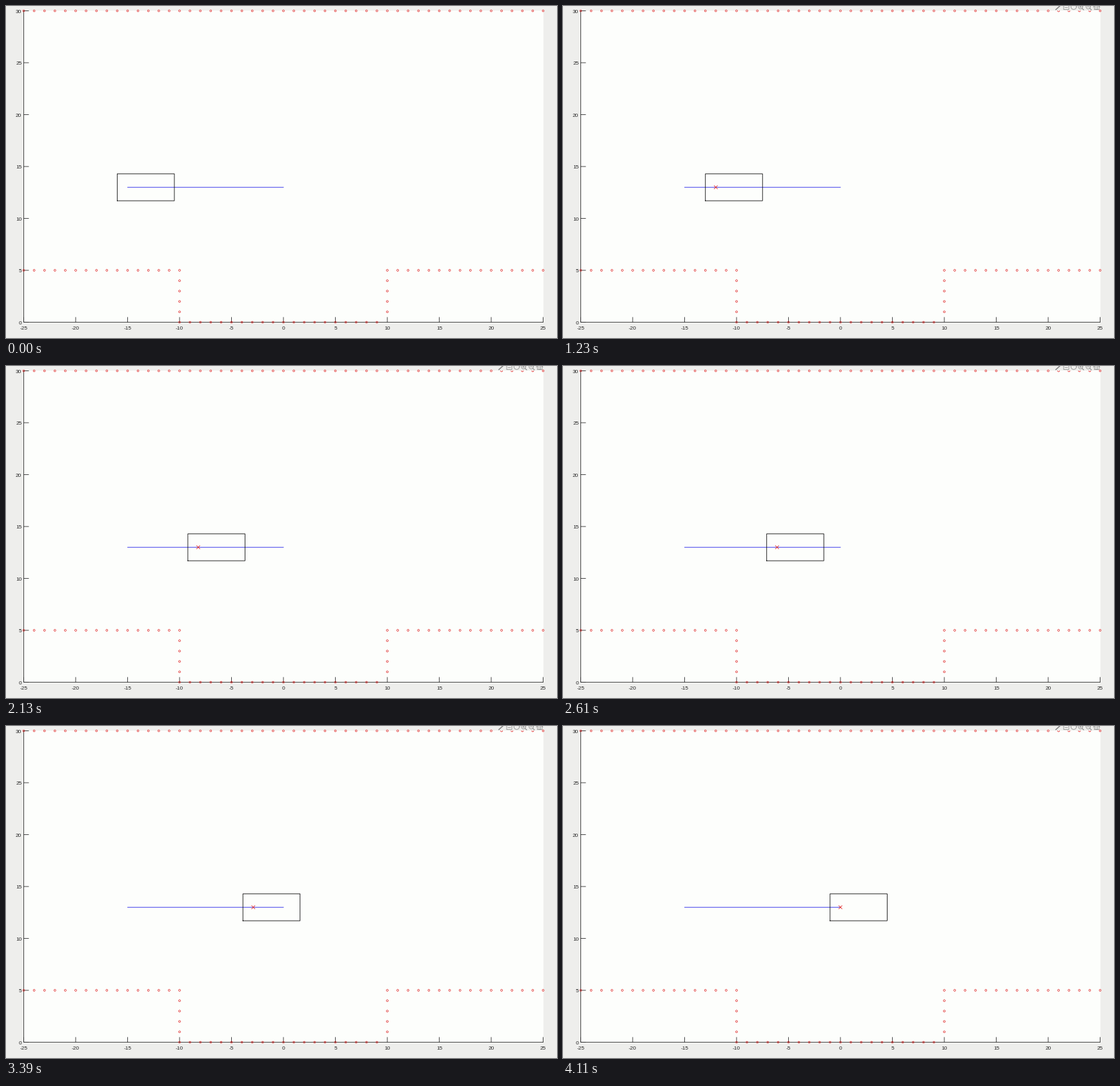
A matplotlib script that plays this animation: 854 by 515 pixels, repeating every 4140 ms.

```python
import numpy as np
import matplotlib.pyplot as plt
from matplotlib.animation import FuncAnimation
from matplotlib.collections import PatchCollection
from matplotlib.patches import Circle, Rectangle

W, H, DPI = 854, 515, 64
PT = 72 / DPI                     # points per pixel
TICK_MS, TICKS = 30, 138
START, STALL = 20, 91             # first move, and one repeated position
STEPS, EASE = 150, 5.39           # path steps of 0.1 units, slight ease-out
INK, RED, BLUE, GREY = "#262626", "#e02828", "#1c1ce8", "#858585"
BACK, PAPER = "#eeeeec", "#fdfefc"

fig = plt.figure(figsize=(W / DPI, H / DPI), dpi=DPI, facecolor=BACK)
ax = fig.add_axes([0, 0, 1, 1])
ax.set(xlim=(0, W), ylim=(H, 0))
ax.axis("off")


def px(x):
    return 430 + 16.1 * np.asarray(x)


def py(y):
    return 490.5 - 16.1 * np.asarray(y)


def line(xs, ys, color=INK, width=0.85, z=2):
    return ax.plot(xs, ys, color=color, lw=width * PT, zorder=z, snap=False,
                   solid_capstyle="projecting", solid_joinstyle="miter")[0]


def label(x, y, value, ha):
    ax.text(x, y, str(value), family="Liberation Sans", size=8.2 * PT,
            color=INK, ha=ha, va="center_baseline")


def draw_axes():
    left, right, top, base = px(-25), px(25), py(30), py(0)
    ax.add_patch(Rectangle((left, top), right - left, base - top,
                           fc=PAPER, lw=0, zorder=0))
    line([left, left, right], [top, base, base])
    for v in range(-25, 26, 5):
        line([px(v)] * 2, [base, base - 7.5])
        label(px(v), 499, v, "center")
    for v in range(0, 31, 5):
        line([left, left + 7.5], [py(v)] * 2)
        label(24.3, py(v) + 0.7, v, "right")


def draw_obstacles():
    pts = [(x, 30) for x in range(-25, 26)]
    pts += [(s * x, 5) for s in (-1, 1) for x in range(10, 26)]
    pts += [(s * 10, y) for s in (-1, 1) for y in range(1, 5)]
    pts += [(x, 0) for x in range(-10, 10)]
    dots = [Circle((px(x), py(y)), 1.4) for x, y in pts]
    ax.add_collection(PatchCollection(dots, facecolor="none", edgecolor=RED,
                                      linewidth=0.75 * PT, zorder=4))


def draw_toolbar():
    cover = Rectangle((762, 0), 69, 7, fc=BACK, lw=0, zorder=5)
    a = np.linspace(0, 2 * np.pi, 33)

    def stroke(xs, ys, width=0.75):
        return line(xs, ys, GREY, width, 6)

    def frame(x, w, bottom):
        return stroke([x, x, x + w, x + w], [0, bottom, bottom, 0])

    def ring(x, y, r):
        return stroke(x + r * np.cos(a), y + r * np.sin(a))

    parts = [ax.add_patch(cover),
             stroke([764, 770], [5.5, 0], 1.6),        # brush
             frame(776, 8, 5.5), stroke([778, 782], [2.5, 2.5]),
             ring(791.5, 1, 4.3),                      # hand
             stroke([802, 802], [0, 2.7]),             # plus of the zoom-in
             stroke([822, 824], [1.5, 0]), stroke([830, 832], [0, 1.5]),
             frame(823.5, 7.5, 5.5), frame(826, 2.5, 5.5)]
    for x in (802, 814):
        parts += [ring(x, 1.2, 3.3), stroke([x - 1.5, x + 1.5], [1.2, 1.2]),
                  stroke([x + 2.6, x + 5], [3.7, 6], 1.1)]
    return parts


def travelled(tick):
    last = TICKS - START - 1
    u = np.clip(tick - START + 1 - (tick >= STALL), 0, last) / last
    return np.ceil(STEPS * u + EASE * u * (1 - u)) / 10


draw_axes()
draw_obstacles()
toolbar = draw_toolbar()
line(px([-15, 0]), py([13, 13]), BLUE)
car = line([], [], "#111111", 0.9, 3)
cross = line([], [], RED, 0.8, 4)


def update(tick):
    rear = travelled(tick) - 15
    x0, x1, y0, y1 = rear - 1, rear + 4.5, 11.7, 14.3
    car.set_data(px([x0, x1, x1, x0, x0]), py([y0, y0, y1, y1, y0]))
    arm = np.array([-2.5, 2.5, np.nan, -2.5, 2.5])
    flip = np.array([1, 1, 1, -1, -1])
    cross.set_data(px(rear) + arm, py(13) + arm * flip)
    for part in (cross, *toolbar):
        part.set_visible(tick >= START)
    return [car, cross, *toolbar]


anim = FuncAnimation(fig, update, frames=TICKS, interval=TICK_MS,
                     repeat=True, repeat_delay=0, blit=False)
plt.show()
```
